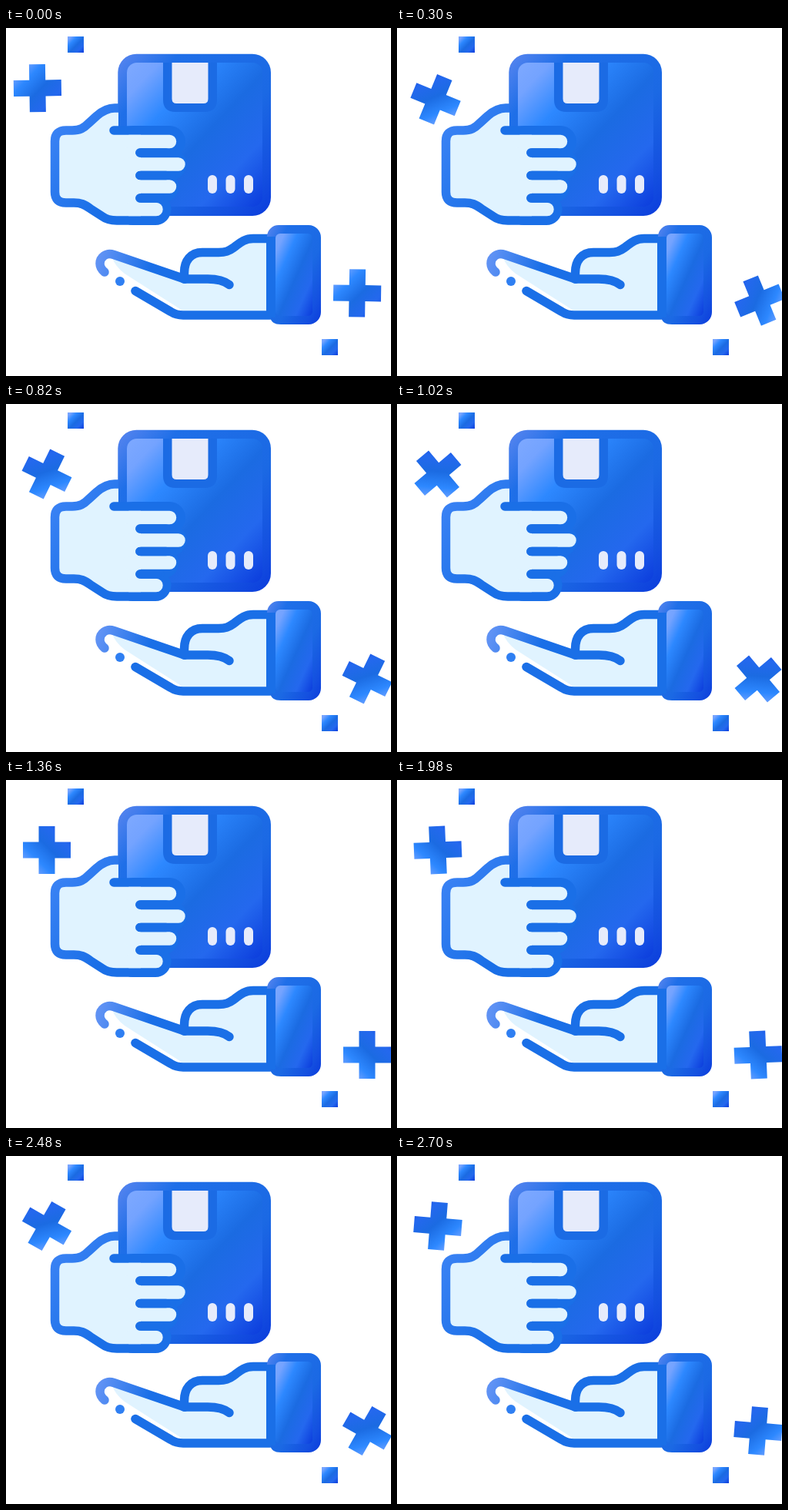
Write an HTML page that moves like this. It is 500 px wide and 452 px high and loops after 2720 ms.

```html
<!DOCTYPE html>
<html lang="en">
<head>
<meta charset="utf-8">
<style>
  html, body { margin: 0; height: 100%; overflow: hidden; background: #fff; }
  svg { display: block; width: 500px; height: 452px; }
  .line { fill: none; stroke: #1a6fe7; stroke-width: 11.5; stroke-linecap: round; stroke-linejoin: round; }
  .skin { fill: #e0f3ff; }
  .paper { fill: #e6ebfb; }
</style>
</head>
<body>
<svg viewBox="0 0 500 452">
  <defs>
    <linearGradient id="face" x1="0" y1="0" x2="1" y2="1">
      <stop offset="0" stop-color="#7ea9ff"/>
      <stop offset=".12" stop-color="#74a3ff"/>
      <stop offset=".3" stop-color="#2d88ff"/>
      <stop offset=".54" stop-color="#1b6be2"/>
      <stop offset=".77" stop-color="#2468ee"/>
      <stop offset="1" stop-color="#0b3cdc"/>
    </linearGradient>
    <linearGradient id="edge" x1="0" y1="0" x2="1" y2="1">
      <stop offset="0" stop-color="#5a86ef"/>
      <stop offset=".2" stop-color="#1f6fe8"/>
      <stop offset=".6" stop-color="#1b69e4"/>
      <stop offset=".85" stop-color="#1450e0"/>
      <stop offset="1" stop-color="#0b3cdc"/>
    </linearGradient>
    <linearGradient id="wrist" gradientUnits="userSpaceOnUse" x1="60" y1="130" x2="150" y2="200">
      <stop offset="0" stop-color="#3a82f4"/>
      <stop offset="1" stop-color="#1a6fe7"/>
    </linearGradient>
    <linearGradient id="tip" gradientUnits="userSpaceOnUse" x1="122" y1="300" x2="185" y2="320">
      <stop offset="0" stop-color="#5f92f4"/>
      <stop offset="1" stop-color="#1a6fe7"/>
    </linearGradient>
    <path id="plus" fill="url(#face)"
      d="M-10.500-31h21v20.500h20.500v21h-20.500v20.500h-21v-20.500h-20.500v-21h20.500z"/>
  </defs>

  <rect x="80" y="11" width="21" height="21" fill="url(#face)"/>
  <rect x="410" y="404" width="21" height="21" fill="url(#face)"/>
  <use id="left" href="#plus"/>
  <use id="right" href="#plus"/>

  <!-- parcel -->
  <rect x="145.300" y="33.700" width="198.700" height="210.300" rx="24" fill="url(#edge)"/>
  <rect x="157" y="45" width="176" height="187" rx="13" fill="url(#face)"/>
  <path d="M204 45h70v48q0 16-16 16h-38q-16 0-16-16z" fill="#1b6be4"/>
  <path class="paper" d="M215.500 45h47v47q0 6-6 6h-35q-6 0-6-6z"/>
  <g class="paper">
    <rect x="262" y="191" width="12" height="24" rx="6"/>
    <rect x="285.500" y="191" width="12" height="24" rx="6"/>
    <rect x="309" y="191" width="12" height="24" rx="6"/>
  </g>

  <!-- giving hand -->
  <path class="line" style="stroke-width:41" d="M165 147.500H212.500M175 177H214M175 206H204M165 235.500H194"/>
  <path class="skin" d="M146 104H141C133 104 125 108 118 114L107 124C101 130 96 133 86 133H78Q63.500 133 63.500 147V213Q63.500 227 78 227H88C97 227 102 229 110 235L124 244Q132 250 144 250H175V133H146Z"/>
  <path class="line" style="stroke-linecap:butt;stroke:url(#wrist)" d="M146 104H141C133 104 125 108 118 114L107 124C101 130 96 133 86 133H78Q63.500 133 63.500 147V213Q63.500 227 78 227H88C97 227 102 229 110 235L124 244Q132 250 144 250H195"/>
  <path class="line" d="M140 133H212M174 162H215M174 191.500H215M174 221H200"/>
  <path class="line" style="stroke:#e0f3ff;stroke-width:17.500" d="M160 147.500H212.500M160 177H224M160 206H212.500M160 235.500H195"/>
  <path class="line" d="M174 162H208M174 191.500H208M174 221H196"/>

  <!-- receiving hand -->
  <path fill="#fff" d="M138 294L231 326 240 372H228Q220 372 214 368L168 342 128 317Q118 300 138 294Z"/>
  <path class="skin" d="M345 273.500H321C308 273.500 302 281 296 285C289 290 285 291.500 276 291.500H255C240 291.500 231.500 302 231.500 316V326L138 297Q140 308 154 319L226 365 234 373H345Z"/>
  <path class="line" style="stroke-linecap:butt" d="M345 273.500H321C308 273.500 302 281 296 285C289 290 285 291.500 276 291.500H255C240 291.500 231.500 302 231.500 318V327"/>
  <path class="line" d="M231 326H262C275 326 283 328 290 333.500M168 341.500L214 368.500Q221 373 230 373H343"/>
  <path class="line" style="stroke:url(#tip)" d="M232 326L140 294.500C130 291 122 298 122 306Q122 312 128 317"/>
  <circle cx="148" cy="329" r="6" fill="#2f7ff2"/>
  <path fill="url(#edge)" d="M354 256h39a16 16 0 0 1 16 16v97a16 16 0 0 1-16 16h-36q-13 0-14-10h-4V271a15 15 0 0 1 15-15z"/>
  <rect x="350" y="267" width="48" height="107" rx="6" fill="url(#face)"/>
  <rect x="338" y="271" width="12" height="105" fill="#1a6fe7"/>
</svg>
<script>
  const LOOP = 2720;
  const progress = (t, from, length) => Math.min(1, Math.max(0, (t - from) / length));

  // Each plus swings half a turn about an off-centre pivot, then spins in place.
  const pluses = [
    { el: document.getElementById('left'), pivot: [47, 84.5], arm: [-6, -6.5], dir: -1 },
    { el: document.getElementById('right'), pivot: [462.5, 350.75], arm: [-6.5, -6.25], dir: 1 }
  ];

  function draw(now) {
    const t = now % LOOP;
    const swing = 180 * (1 - (1 - progress(t, 0, 600)) ** 3);
    const spin = 90 * (progress(t, 600, 760) - progress(t, 1960, 780));
    for (const { el, pivot, arm, dir } of pluses) {
      el.setAttribute('transform',
        `translate(${pivot}) rotate(${dir * swing}) translate(${arm}) rotate(${spin})`);
    }
  }

  const start = performance.now();
  function tick() {
    draw(performance.now() - start);
    requestAnimationFrame(tick);
  }
  tick();
</script>
</body>
</html>
```
